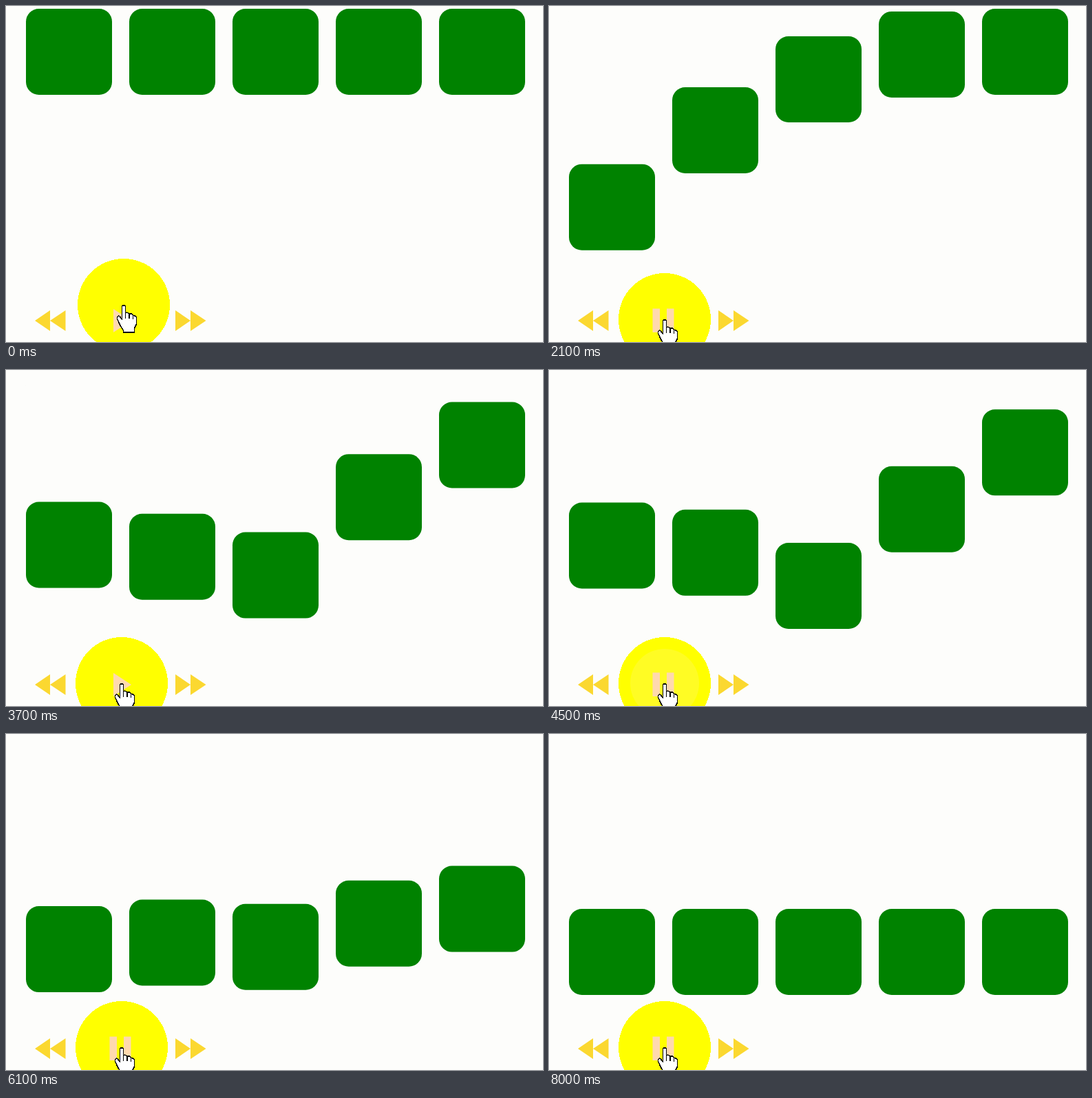
Animation, 780 px wide and 488 px high, one loop 9100 ms. Source, as an HTML page:

```html
<!DOCTYPE html>
<html lang="en">
<head>
<meta charset="utf-8">
<title>Bouncing boxes</title>
<style>
  html, body { margin: 0; width: 100%; height: 100%; overflow: hidden; background: #fdfdfb; }
  svg { display: block; width: 780px; height: 488px; }
  .box { fill: #008200; }
  .arrow { fill: #fbd830; }
  .icon { fill: #ffd9ae; }
  .hand { fill: #fff; stroke: #000; stroke-width: 1.5; stroke-linejoin: round; }
  #halo, .hand { shape-rendering: crispEdges; }
</style>
</head>
<body>
<svg viewBox="0 0 780 488">
  <g id="boxes"></g>
  <path class="arrow" d="M42 457l22-15v30zM64 457l22.500-15v30z"/>
  <path class="arrow" d="M268 457l-22-15v30zM290.500 457l-22.500-15v30z"/>
  <circle id="halo" r="67" fill="#ff0"/>
  <circle id="ripple" cx="168" cy="455" r="50" fill="#fff0a0"/>
  <path id="play" class="icon" d="M156 440l26 17-26 17z"/>
  <path id="pause" class="icon" d="M150.500 439.500h10.500v34.500h-10.500zM171 439.500h10.500v34.500h-10.500z"/>
  <g id="cursor" class="hand">
    <path d="M-2.500 2.500Q-2.500 .7 0 .7Q2.500 .7 2.500 2.500V11.500Q6 10.500 8 13Q12 12 13.500 15.500Q18 15.500 18.500 19V28L15.500 34V40H-.5V37L-5 30L-9.300 21V17.500Q-8.500 15.500-6 16.500L-2.500 21.500Z"/>
    <path fill="none" d="M2.500 11v9M8 13v7M13.500 15.500v5"/>
  </g>
</svg>
<script>
  const LOOP = 9100, STEP = 100;
  const TOP = 4, DROP = 250, DURATION = 2000, STAGGER = 0.1;
  const FADE = 400, GLOW = 0.25;
  // Playing spans, ms; a click starts and ends each one
  const runs = [[1409, 2159], [2893, 3243], [4464, 4745], [5578, 6397], [7150, 7760]];
  const clicks = runs.flat().slice(0, -1);

  const $ = id => document.getElementById(id);
  const clamp = (v, lo, hi) => Math.min(hi, Math.max(lo, v));

  const boxes = Array.from({ length: 5 }, (_, i) => {
    const r = document.createElementNS("http://www.w3.org/2000/svg", "rect");
    const attrs = { class: "box", x: 29 + 150 * i, y: TOP, width: 125, height: 125, rx: 18.75 };
    for (const k in attrs) r.setAttribute(k, attrs[k]);
    return $("boxes").appendChild(r);
  });

  function bounce(p) {
    const k = 7.5625, d = 2.75;
    if (p < 1 / d) return k * p * p;
    if (p < 2 / d) return k * (p - 1.5 / d) ** 2 + 0.75;
    if (p < 2.5 / d) return k * (p - 2.25 / d) ** 2 + 0.9375;
    return k * (p - 2.625 / d) ** 2 + 0.984375;
  }

  function draw(t) {
    const played = runs.reduce((sum, [a, b]) => sum + clamp(t - a, 0, b - a), 0) / DURATION;
    boxes.forEach((box, i) => {
      const y = TOP + DROP * bounce(clamp(played - STAGGER * i, 0, 1));
      box.setAttribute("y", y.toFixed(2));
    });

    // Each click flips the icon; the last run ends without one
    const past = clicks.filter(c => c <= t);
    const playing = past.length % 2 === 1;
    $("play").style.display = playing ? "none" : "";
    $("pause").style.display = playing ? "" : "none";

    const age = past.length ? t - past[past.length - 1] : FADE;
    $("ripple").style.opacity = GLOW * clamp(1 - age / FADE, 0, 1);

    const m = clamp(t / 400, 0, 1);
    const move = `translate(${171 - 3 * m} ${434 + 21 * m})`;
    $("halo").setAttribute("transform", move);
    $("cursor").setAttribute("transform", move);
  }

  const start = performance.now();
  function tick() {
    const t = (performance.now() - start) % LOOP;
    draw(Math.floor(t / STEP) * STEP);
    requestAnimationFrame(tick);
  }
  draw(0);
  requestAnimationFrame(tick);
</script>
</body>
</html>
```
